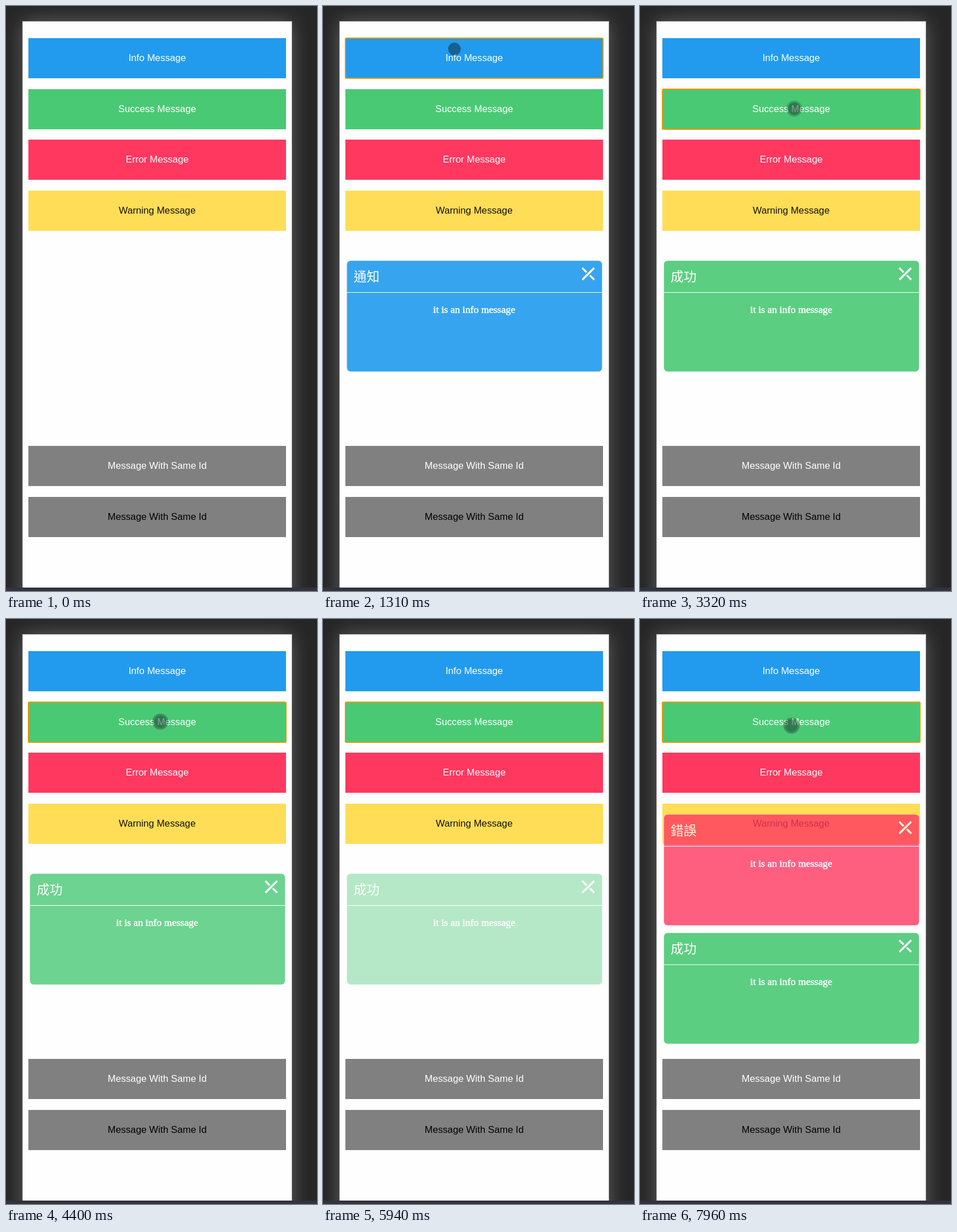
An HTML page for the animation above (8000 ms loop, 542 by 1020 pixels).

```html
<!DOCTYPE html>
<html lang="en">
<head>
<meta charset="utf-8">
<title>Message cards</title>
<style>
  html, body { margin: 0; width: 100%; height: 100%; overflow: hidden; background: #262626; }
  #stage { position: relative; width: 542px; height: 1020px; overflow: hidden; }
  #panel { position: absolute; left: 29px; top: 27px; width: 469px; height: 1020px;
           background: #fefefe; box-shadow: 0 0 0 1px #6b6b6b, 0 0 32px rgba(255, 255, 255, .28); }
  #bar { position: absolute; left: 0; top: 1014px; width: 100%; height: 6px; background: #33333d; }
  svg { position: absolute; left: 0; top: 0; }
  .label { font: 16.7px "Liberation Sans", Arial, sans-serif; text-anchor: middle; }
  .title { font: 300 22.5px "Noto Sans CJK TC", "Noto Sans CJK", "Noto Sans CJK SC", sans-serif; fill: #fff; }
  .body { font: 17.5px "Liberation Serif", "Times New Roman", serif; text-anchor: middle;
          fill: #fff; stroke: #fff; stroke-width: .5; }
</style>
</head>
<body>
<div id="stage">
  <div id="panel"></div>
  <div id="bar"></div>
  <svg id="scene" width="542" height="1020"></svg>
</div>
<script>
const LOOP = 8000;
const ROW_TOP = 56, ROW_PITCH = 88.7;
const CARD_TOP = 444, CARD_PITCH = 206.5;
const FADE = 2380, FADE_LEVELS = 5;
const scene = document.getElementById('scene');

const kinds = [
  { color: '#229bee', label: 'Info Message', title: '通知' },
  { color: '#4ac975', label: 'Success Message', title: '成功' },
  { color: '#ff3860', label: 'Error Message', title: '錯誤' },
  { color: '#ffdd57', label: 'Warning Message', title: '警告', textColor: '#111' },
];

// What a click does follows from where it lands.
const clicks = [
  { time: 1310, x: 229, y: 75, hold: 540 },
  { time: 2540, x: 466, y: 471, hold: 310 },
  { time: 3250, x: 269, y: 179, hold: FADE },
  { time: 6250, x: 466, y: 471, hold: 70 },
  { time: 6870, x: 288, y: 263, hold: 490 },
  { time: 7430, x: 264, y: 186, hold: 570 },
];

function add(parent, tag, attrs, text) {
  const node = document.createElementNS('http://www.w3.org/2000/svg', tag);
  for (const name in attrs) node.setAttribute(name, attrs[name]);
  if (text) node.textContent = text;
  return parent.appendChild(node);
}

function show(node, visible) {
  node.setAttribute('visibility', visible ? 'visible' : 'hidden');
}

const rowY = row => Math.round(ROW_TOP + row * ROW_PITCH);

function addButton(y, color, text, textColor = '#fff') {
  add(scene, 'rect', { x: 39, y, width: 449, height: 70, fill: color });
  add(scene, 'text', { class: 'label', x: 263.5, y: y + 40, fill: textColor }, text);
}

function addCard({ color, title }) {
  const card = add(scene, 'g', { visibility: 'hidden' });
  add(card, 'rect', { x: 41.5, y: CARD_TOP, width: 445, height: 193.5, rx: 6.5,
    fill: color, stroke: '#fff', 'stroke-opacity': .35 });
  add(card, 'rect', { x: 41.5, y: 499, width: 445, height: 1, fill: '#fff' });
  add(card, 'text', { class: 'title', x: 53.5, y: 480 }, title);
  add(card, 'text', { class: 'body', x: 263.5, y: 535 }, 'it is an info message');
  add(card, 'path', { d: 'M452 477.3L472.6 456.7M451.8 456.8L459.4 464.4M465 469.6L472.7 477.3',
    stroke: '#fff', 'stroke-width': 3.4 });
  return card;
}

kinds.forEach((kind, row) => addButton(rowY(row), kind.color, kind.label, kind.textColor));
addButton(767, '#808080', 'Message With Same Id');
addButton(856, '#808080', 'Message With Same Id', '#000');

const ring = add(scene, 'rect', { x: 39, width: 449, height: 70, rx: 2,
  fill: 'none', stroke: '#e59a08', 'stroke-width': 2 });
const cards = kinds.map(addCard);

const pointer = add(scene, 'g', {});
const halo = add(pointer, 'circle', { r: 12.5, fill: 'none', stroke: '#000', 'stroke-width': 3 });
add(pointer, 'circle', { r: 11, fill: '#0b1a20', 'fill-opacity': .45 });

// Cards dim from 0.9 to 0.4 in visible steps, slowly at first.
function cardOpacity(age) {
  const eased = Math.min(1, age / FADE) ** 2;
  return .9 - .5 * Math.floor(eased * FADE_LEVELS) / FADE_LEVELS;
}

function draw(time) {
  const open = [];
  let focused = -1, last = null;
  for (const click of clicks.filter(c => c.time <= time)) {
    last = click;
    if (click.y > CARD_TOP) {
      open.shift();
      focused = -1;
    } else {
      focused = Math.floor((click.y - ROW_TOP) / ROW_PITCH);
      open.push({ row: focused, since: click.time });
    }
  }

  cards.forEach(card => show(card, false));
  open.forEach(({ row, since }, i) => {
    const offset = (i - (open.length - 1) / 2) * CARD_PITCH;
    show(cards[row], true);
    cards[row].setAttribute('opacity', cardOpacity(time - since));
    cards[row].setAttribute('transform', `translate(0 ${offset})`);
  });

  show(ring, focused >= 0);
  ring.setAttribute('y', rowY(focused));

  const pressed = last && time < last.time + last.hold;
  show(pointer, pressed);
  if (pressed) {
    pointer.setAttribute('transform', `translate(${last.x} ${last.y})`);
    halo.setAttribute('stroke-opacity', .25 * Math.min(1, (time - last.time) / 100));
  }
}

const start = performance.now();
function tick() {
  draw((performance.now() - start) % LOOP);
  requestAnimationFrame(tick);
}
tick();
</script>
</body>
</html>
```
